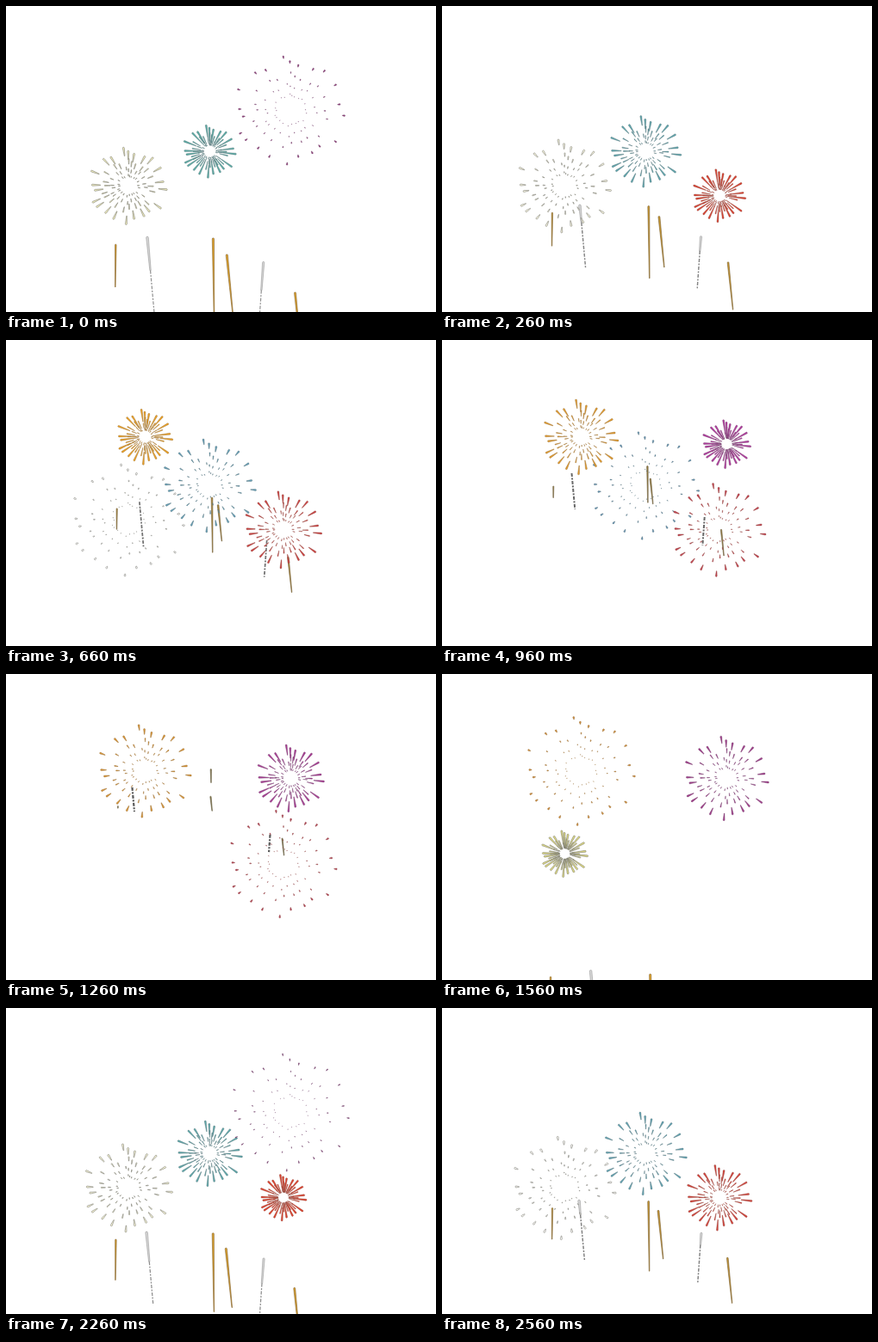
Write an HTML page with a canvas that moves like this. It is 499 px wide and 356 px high and loops after 2660 ms.

```html
<!DOCTYPE html>
<html lang="en">
<head>
<meta charset="utf-8">
<title>Fireworks</title>
<style>
html, body { margin: 0; width: 100%; height: 100%; overflow: hidden; background: #fff; }
canvas { display: block; }
</style>
</head>
<body>
<canvas id="stage" width="499" height="356"></canvas>
<script>
const ctx = document.getElementById('stage').getContext('2d');
const LOOP = 2660, STEP = 100, FIRST_STEP = 60;
const BURST_PERIOD = 21, BURST_BORN = 5.45, BURST_DEAD = 19.95;
const TRAIL_PERIOD = 22.35, TRAIL_SWITCH = 16;

// Spark directions of a burst whose radius is about 57.
const SPARKS = [
  [-8, -57], [-1, -52], [8, -48], [24, -44], [36, -42], [48, -27], [52, -6], [57, 6],
  [48, 34], [31, 39], [23, 46], [8, 50], [-4, 58], [-23, 50], [-35, 41], [-48, 32],
  [-54, 25], [-51, 7], [-55, -1], [-56, -22], [-38, -40], [-27, -43]
].map(([x, y]) => ({ angle: Math.atan2(y, x), reach: Math.hypot(x, y) / 57 }));

const RINGS = [
  { scale: 0.3, turn: 0.1, length: 0.25, width: 0.5 },
  { scale: 0.49, turn: 0, length: 0.4, width: 0.7 },
  { scale: 0.7, turn: 0.14, length: 0.65, width: 1.1 },
  { scale: 1, turn: 0, length: 1, width: 2 }
];

const BURSTS = [
  { x: 142.5, y: 209, offset: 11.5, young: [220, 214, 110], old: [255, 255, 255], edge: [120, 120, 112], hollow: true },
  { x: 236.5, y: 169, offset: 7.5, young: [88, 178, 160], old: [104, 155, 190], edge: [78, 98, 104] },
  { x: 322, y: 220.5, offset: 4.5, young: [226, 66, 38], old: [185, 66, 90], edge: [130, 70, 62] },
  { x: 161.5, y: 112.5, offset: 0.4, size: 1.06, young: [242, 166, 30], old: [205, 142, 65], edge: [135, 100, 52] },
  { x: 330.5, y: 121, offset: -3.2, young: [182, 58, 164], old: [150, 62, 125], edge: [105, 62, 100] }
];

// x, y: head position at phase 0; vx, vy: speed; drag: cubic slowdown;
// length and shrink: tail size; lean: sideways shift per pixel of tail.
const TRAILS = [
  { x: 127.3, y: 277, vx: 0.2, vy: 12.5, drag: 0.0175, length: 50, shrink: 3.6, lean: -0.01, width: 2.2 },
  { x: 164, y: 268, vx: -1.35, vy: 12.5, drag: 0.012, length: 88, shrink: 4.6, lean: 0.09, width: 3.2, silver: true },
  { x: 240.4, y: 270, vx: -0.2, vy: 12.5, drag: 0.0012, length: 93, shrink: 2, curve: 0.3, lean: 0.012, width: 2.8 },
  { x: 256.3, y: 289, vx: -1.45, vy: 15, drag: 0.0218, length: 72, shrink: 4.2, lean: 0.1, width: 2.8 },
  { x: 298.7, y: 297, vx: 0.6, vy: 10, drag: 0.009, length: 75, shrink: 4.2, lean: -0.07, width: 2.8, silver: true },
  { x: 335.5, y: 333, vx: -1.15, vy: 11.8, drag: 0.005, length: 66, shrink: 3.5, lean: 0.1, width: 2.6 }
];

const clamp = (v, lo, hi) => Math.min(hi, Math.max(lo, v));
const mod = (v, n) => ((v % n) + n) % n;
const mix = (a, b, k) => a.map((v, i) => Math.round(v + (b[i] - v) * k));
const css = color => `rgb(${color.join()})`;

function paintTaper(headX, headY, tailX, tailY, width, tailWidth) {
  const angle = Math.atan2(headY - tailY, headX - tailX);
  const nx = -Math.sin(angle) / 2, ny = Math.cos(angle) / 2;
  ctx.beginPath();
  ctx.moveTo(tailX + nx * tailWidth, tailY + ny * tailWidth);
  ctx.lineTo(headX + nx * width, headY + ny * width);
  ctx.arc(headX, headY, width / 2, angle + Math.PI / 2, angle - Math.PI / 2, true);
  ctx.lineTo(tailX - nx * tailWidth, tailY - ny * tailWidth);
  ctx.closePath();
  ctx.fill();
  ctx.stroke();
}

function drawBurst(burst, step) {
  const age = mod(step + burst.offset, BURST_PERIOD);
  if (age < BURST_BORN || age > BURST_DEAD) return;
  const radius = (4.52 * age - 0.055 * age * age) * (burst.size || 1);
  const length = clamp(27.5 - 0.385 * radius, 2.8, radius * 0.6);
  const fade = clamp((age - 17) / 3, 0, 1);
  const color = mix(burst.young, burst.old, clamp((age - 5) / 12, 0, 1));
  const thickness = 1 - fade * (burst.hollow ? 0.1 : 0.5);
  ctx.fillStyle = css(burst.hollow ? color : mix(color, burst.edge, fade * 0.6));
  ctx.strokeStyle = css(burst.edge);
  ctx.lineWidth = burst.hollow ? 0.55 : 0.35;
  for (const ring of RINGS) {
    const width = ring.width * thickness;
    for (const { angle, reach } of SPARKS) {
      const dx = Math.cos(angle + ring.turn), dy = Math.sin(angle + ring.turn);
      const head = radius * reach * ring.scale - width / 2;
      const tail = Math.max(radius * 0.22, head - length * ring.length + width / 2);
      if (tail >= head) continue;
      paintTaper(burst.x + dx * head, burst.y + dy * head,
                 burst.x + dx * tail, burst.y + dy * tail, width, width * 0.3);
    }
  }
}

function drawSilver(x, y, length, lean, width, phase) {
  const solid = length * clamp(0.45 - 0.055 * phase, 0, 0.7);
  const age = clamp(phase / 13, 0, 1);
  if (solid > 4) {
    ctx.fillStyle = '#d6d6d6';
    ctx.strokeStyle = '#999';
    ctx.lineWidth = 0.6;
    paintTaper(x, y + 1.5, x + lean * solid, y + solid, width - 0.6, 1.4);
  }
  ctx.strokeStyle = css(mix([145, 145, 145], [90, 90, 90], age));
  ctx.lineWidth = 1.2 + age;
  ctx.setLineDash([4, 1.5, 2, 1.5]);
  ctx.beginPath();
  ctx.moveTo(x + lean * solid, y + solid);
  ctx.lineTo(x + lean * length, y + length);
  ctx.stroke();
  ctx.setLineDash([]);
}

function drawGold(x, y, length, lean, width, phase) {
  const dull = clamp(phase / 13, 0, 1);
  ctx.fillStyle = css(mix([226, 164, 40], [130, 115, 65], dull));
  ctx.strokeStyle = css(mix([125, 95, 48], [105, 98, 75], dull));
  ctx.lineWidth = 0.6;
  paintTaper(x, y + 1, x + lean * length, y + length, (width - 0.6) * (1 - dull * 0.4), 0.6);
}

function drawTrail(trail, step) {
  const phase = step < TRAIL_SWITCH ? step : step - TRAIL_PERIOD;
  const x = trail.x + trail.vx * phase;
  const y = trail.y - trail.vy * phase + trail.drag * phase ** 3;
  const length = trail.length - trail.shrink * phase - (trail.curve || 0) * phase * phase;
  if (length < 3) return;
  const draw = trail.silver ? drawSilver : drawGold;
  draw(x, y, length, trail.lean, trail.width, phase);
}

function render(now) {
  const time = now % LOOP;
  const step = Math.floor((time + STEP - FIRST_STEP) / STEP);
  ctx.fillStyle = '#fff';
  ctx.fillRect(0, 0, 499, 356);
  TRAILS.forEach(trail => drawTrail(trail, step));
  BURSTS.forEach(burst => drawBurst(burst, step));
}

const start = performance.now();
function tick() {
  render(performance.now() - start);
  requestAnimationFrame(tick);
}
tick();
</script>
</body>
</html>
```
